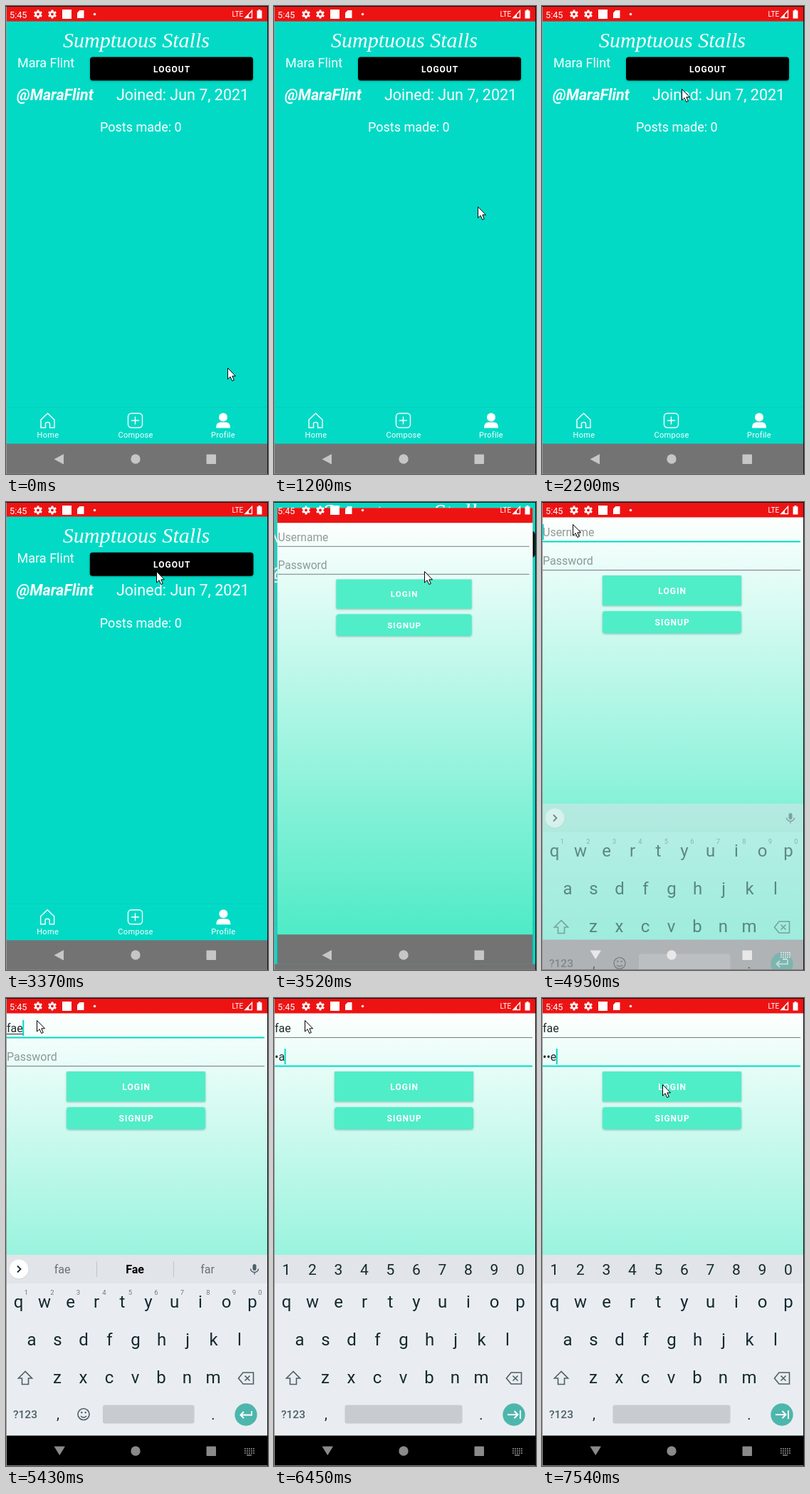
An HTML page with a canvas for the animation above (8 s loop, 368 by 656 pixels).

```html
<!DOCTYPE html>
<html lang="en">
<head>
<meta charset="utf-8">
<title>Profile and login</title>
<style>
html, body { margin: 0; width: 100%; height: 100%; overflow: hidden; }
canvas { display: block; }
</style>
</head>
<body>
<canvas id="stage" width="368" height="656"></canvas>
<script>
const ctx = document.getElementById('stage').getContext('2d');
const LOOP = 8000, W = 368, H = 656, TAU = Math.PI * 2;
const TOP = 21.5, BOTTOM = 613.5;
const TEAL = '#02dac6', MINT = '#50edc9', INK = '#14292f', GREY = '#4d5f66';
const USER = 'fae', ROWS = ['qwertyuiop', 'asdfghjkl', 'zxcvbnm'];

// Timed states: [start, ...values]; each holds until the next one
const pointer = [
  [0, 311, 507], [150, 265, 246], [300, 243, 150], [430, 221, 86], [1050, 81, 131],
  [1200, 286, 281], [1350, 153, 166], [1500, 114, 201], [1620, 214, 158], [1770, 199, 121],
  [2200, 196, 116], [2320, 183, 98], [2460, 188, 92], [2580, 196, 88], [2710, 204, 92],
  [2830, 211, 97], [3760, 205, 92], [3880, 160, 70], [4000, 100, 48], [4130, 60, 36],
  [4250, 43, 31], [7150, 99, 76], [7300, 130, 95], [7420, 160, 115], [7540, 169, 121]
];
// Old page scale, new page scale, new page opacity
const pageChange = [[0, 1, .85, 0], [3370, 1.003, .85, 0], [3520, 1.12, .975, 1], [3640, 1.15, .997, 1], [3760, 1.15, 1, 1]];
const keyboardRise = [[0, 0, 0], [4950, 63, .52], [5070, 8, .93], [5190, 0, 1]];
const userTyping = [[0, ''], [5190, 'f'], [5310, 'fa'], [5430, USER]];
const passTyping = [[0, ''], [6300, 'f'], [6450, '•a'], [6570, '••e']];
const at = (states, t) => states.findLast(s => s[0] <= t).slice(1);

function text(str, x, y, size, color, { weight = 400, align = 'left', gap = 0, family = 'Roboto, sans-serif' } = {}) {
  ctx.font = `${weight} ${size}px ${family}`;
  ctx.letterSpacing = gap + 'px';
  ctx.textAlign = align;
  ctx.fillStyle = color;
  ctx.fillText(str, x, y);
  return ctx.measureText(str).width;
}
const centered = (str, x, y, size, color, style) =>
  text(str, x, y, size, color, { align: 'center', ...style });

function rect(x, y, w, h, color, radius = 0) {
  ctx.fillStyle = color;
  ctx.beginPath();
  ctx.roundRect(x, y, w, h, radius);
  ctx.fill();
}
function disc(x, y, r, color) {
  ctx.fillStyle = color;
  ctx.beginPath();
  ctx.arc(x, y, r, 0, TAU);
  ctx.fill();
}
function fill(d, color) {
  ctx.fillStyle = color;
  ctx.fill(new Path2D(d));
}
function line(d, color, width = 1.5) {
  ctx.strokeStyle = color;
  ctx.lineWidth = width;
  ctx.stroke(new Path2D(d));
}

function button(label, x, y, w, h, color, radius) {
  ctx.save();
  ctx.shadowColor = 'rgba(0,70,55,.35)';
  ctx.shadowBlur = 3;
  ctx.shadowOffsetY = 1;
  rect(x, y, w, h, color, radius);
  ctx.restore();
  centered(label, x + w / 2 + .6, y + h / 2 + 4.5, 12, '#fff', { weight: 700, gap: 1 });
}

function gear(x, y) {
  ctx.strokeStyle = '#fff';
  ctx.lineWidth = 2.6;
  ctx.beginPath();
  ctx.arc(x, y, 3.2, 0, TAU);
  ctx.stroke();
  for (let i = 0; i < 6; i++) {
    const a = i * TAU / 6 + TAU / 12, c = Math.cos(a), s = Math.sin(a);
    line(`M${x + 3 * c} ${y + 3 * s}L${x + 6 * c} ${y + 6 * s}`, '#fff', 2.8);
  }
}

function statusIcons() {
  text('5:45', 5, 16.5, 12.7, '#fff');
  gear(45, 11.5);
  gear(65, 11.5);
  rect(79, 5, 13, 13, '#fff');
  fill('M103.500 6h6v11h-9.500v-7.500z', '#fff');
  disc(124.5, 11.5, 1.8, '#fff');
  text('LTE', 317.500, 15, 10, '#fff');
  line('M336 16.500L345.500 6.500V16.500z', '#fff', 1.3);
  fill('M335 17L341 11V17z', '#fff');
  fill('M352.500 6.500h2v-1.500h3v1.500h2v11h-7z', '#fff');
}

function navIcons(keyboardOpen, color) {
  fill(keyboardOpen ? 'M67.500 628.500h15.500l-7.750 12.500z' : 'M81 628v14.500l-13.500-7.250z', color);
  disc(182, 635, 6.7, color);
  rect(281.5, 628.5, 13.5, 13.5, color, 1);
  if (!keyboardOpen) return;
  for (let i = 0; i < 15; i++) rect(335 + i % 5 * 3, 631 + Math.floor(i / 5) * 3, 1.8, 1.8, color);
  rect(338, 640, 7, 1.5, color);
}

// Window background with its system bar colours
function windowFrame(background) {
  rect(0, 0, W, H, '#737373');
  rect(0, 0, W, BOTTOM, background);
  rect(0, 0, W, TOP, '#ee1313');
}

function profilePage(t) {
  windowFrame(TEAL);
  centered('Sumptuous Stalls', 183, 58, 30, '#fff', { weight: 'italic 400', family: '"Liberation Serif", serif' });
  text('Mara Flint', 16, 86, 18, '#fff');
  button('LOGOUT', 118, 71.5, 229, 33, '#000', 4);
  if (t >= 3110 && t < 3370) rect(118, 71.5, 227, 33, 'rgba(255,255,255,.13)', 4);
  text('@MaraFlint', 15, 132, 21.5, '#fff', { weight: 'italic 700' });
  text('Joined: Jun 7, 2021', 155, 132, 21.5, '#fff');
  text('Posts made: 0', 132, 176, 18, '#fff');

  rect(0, 562, W, 1, '#04cebb');
  line('M49 580L58.500 571L68 580V591H61.500V585.500Q61.500 583.500 58.500 583.500Q55.500 583.500 55.500 585.500V591H49z', '#fff', 1.4);
  ctx.beginPath();
  ctx.roundRect(171.5, 571, 20, 20, 4.5);
  ctx.stroke();
  line('M181.500 575.500v11M176 581h11', '#fff', 1.4);
  disc(305, 576.5, 6, '#fff');
  fill('M295 591.500Q295 583.500 301 583.500H309Q315 583.500 315 591.500z', '#fff');
  [['Home', 59], ['Compose', 182], ['Profile', 305]].forEach(([label, x]) =>
    centered(label, x, 605, 11, '#fff', { gap: .3 }));
}

function field(y, value, hint, focused, caretOn) {
  const width = value ? text(value, 1, y, 16, '#202b29') : 0;
  if (!value) text(hint, 1, y, 16, 'rgba(0,0,0,.4)');
  if (focused) {
    rect(1, y + 6.5, 362, 2, TEAL);
    if (caretOn) rect(width + .5, y - 17, 2, 22, TEAL);
  } else rect(1, y + 7, 362, 1, 'rgba(0,0,0,.5)');
  return width;
}

function loginPage(t) {
  const gradient = ctx.createLinearGradient(0, TOP, 0, BOTTOM);
  gradient.addColorStop(0, '#fdfffe');
  gradient.addColorStop(1, '#4eebc6');
  windowFrame(gradient);
  const [user] = at(userTyping, t), [pass] = at(passTyping, t);
  const onUser = t >= 4550 && t < 5870, onPass = t >= 5870;
  const width = field(48, user, 'Username', onUser, true);
  if (onUser && user) rect(1, 50, width, 1, '#202b29');
  field(88, pass, 'Password', onPass, t < 7000 || t >= 7420);
  button('LOGIN', 85, 103, 195, 42, MINT, 1);
  button('SIGNUP', 85, 153, 195, 31, MINT, 4);
}

function suggestionStrip(word) {
  disc(18, 380.5, 14, 'rgba(0,0,0,.07)');
  disc(18, 380, 13.5, '#fff');
  line('M16 375.500l4.500 4.500l-4.500 4.500', INK, 1.8);
  rect(346.5, 373, 5, 9, GREY, 2.5);
  line('M343.500 379.500a5.500 5 0 0 0 11 0M349 384.500v3', GREY, 1.4);
  if (!word) return;
  centered(word, 79, 386, 16, '#667379');
  centered(word[0].toUpperCase() + word.slice(1), 181, 386, 16, '#000', { weight: 700 });
  centered('far', 283, 386, 16, '#667379');
  rect(127, 369, 1, 22, '#c0c5c9');
  rect(235, 369, 1, 22, '#c0c5c9');
}

function keyboard(t) {
  const forPassword = t >= 5990, digits = '1234567890';
  rect(0, 360, W, 40, '#e1e4e8');
  rect(0, 400, W, BOTTOM - 400, '#e9edf1');
  rect(0, BOTTOM, W, H - BOTTOM, '#000');
  if (!forPassword) suggestionStrip(at(userTyping, t)[0]);
  [...digits].forEach((digit, i) => forPassword
    ? centered(digit, 17.5 + i * 36.5, 388, 21, INK)
    : centered(digit, 28.5 + i * 36.5, 416, 9.5, '#6b7b81'));
  ROWS.forEach((row, r) => [...row].forEach((key, i) =>
    centered(key, [17.5, 36, 72][r] + i * 36.5, [434, 486.5, 539.5][r], 24, INK)));

  line('M27 523.500L17.500 533H22.500V541.500H31.500V533H36.500z', GREY, 1.6);
  line('M333 525H347.500V541H333L326.500 533zM335.500 529.500l7 7M342.500 529.500l-7 7', GREY, 1.6);
  centered('?123', 27, 589, 15.5, GREY, { weight: 500 });
  centered(',', 73, 590, 20, INK);
  centered('.', 291, 591, 20, INK);
  const spaceX = forPassword ? 99.5 : 136;
  rect(spaceX, 570.5, 264.5 - spaceX, 26, '#c8ccd0', 3);
  if (!forPassword) {
    line('M117 583.500a8 8 0 1 0-16 0a8 8 0 1 0 16 0M105 586q4 4 8 0', GREY, 1.6);
    disc(106.3, 581, 1.2, GREY);
    disc(111.7, 581, 1.2, GREY);
  }
  disc(337, 584, 15.7, '#4db6ac');
  line(forPassword ? 'M328 584h14M337.500 579l5 5l-5 5M346 578v12' : 'M345 579v5.500h-15M334 580l-4.500 4.500l4.500 4.500', '#fff', 2);
}

function cursor(x, y) {
  ctx.save();
  ctx.translate(x + .5, y + .5);
  const arrow = 'M0 0V15.500L3.600 12.200L6.200 18L8.800 16.900L6.300 11.300H11z';
  fill(arrow, '#fff');
  line(arrow, '#000', 1);
  ctx.restore();
}

function layer(paint, t, { alpha = 1, scale = 1, drop = 0 }) {
  if (!alpha) return;
  ctx.save();
  ctx.globalAlpha = alpha;
  ctx.translate(W / 2, H / 2 + drop);
  ctx.scale(scale, scale);
  ctx.translate(-W / 2, -H / 2);
  paint(t);
  ctx.restore();
}

function draw(t) {
  const [oldScale, newScale, opacity] = at(pageChange, t), [drop, alpha] = at(keyboardRise, t);
  if (newScale < 1) layer(profilePage, t, { scale: oldScale });
  layer(loginPage, t, { scale: newScale, alpha: opacity });
  layer(keyboard, t, { alpha, drop });
  statusIcons();
  navIcons(alpha > 0, !alpha ? '#c6c6c6' : alpha < .9 ? '#e8e8e8' : '#8a8a8a');
  rect(0, 655, W, 1, '#808080');
  rect(0, 0, 1, H, '#9a9a9a');
  rect(0, 0, W, 1, '#111');
  rect(367, 0, 1, H, '#111');
  cursor(...at(pointer, t));
}

const start = performance.now();
function tick() {
  draw((performance.now() - start) % LOOP);
  requestAnimationFrame(tick);
}
tick();
</script>
</body>
</html>
```
